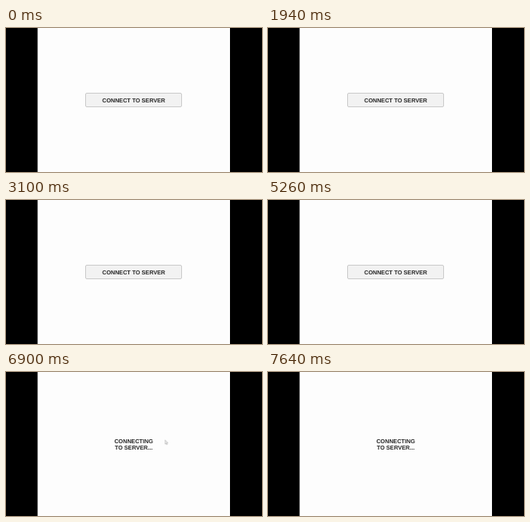
An HTML page that plays this animation: 320 by 180 pixels, repeating every 8000 ms.

```html
<!DOCTYPE html>
<html lang="en">
<head>
<meta charset="utf-8">
<title>Connect to server</title>
<style>
  html, body { margin: 0; width: 100%; height: 100%; overflow: hidden; background: #000; }
  svg { display: block; width: 100%; height: 100%; }
  text {
    font: bold 7.2px "Liberation Sans", Arial, sans-serif;
    fill: #262626;
    text-anchor: middle;
    text-rendering: geometricPrecision;
  }
  .button { animation: button 8s step-end infinite; }
  .status { animation: status 8s step-end infinite; }
  .pointer { animation: pointer 8s step-end infinite; }

  @keyframes button {
    0% { visibility: visible; }
    83.75%, 100% { visibility: hidden; }
  }
  @keyframes status {
    0% { visibility: hidden; }
    83.75%, 100% { visibility: visible; }
  }
  @keyframes pointer {
    0% { visibility: hidden; transform: translate(258.5px, 128px); }
    36.25% { visibility: visible; transform: translate(258.5px, 128px); }
    38.75% { visibility: hidden; transform: translate(167.6px, 92px); }
    83.75% { visibility: visible; transform: translate(167.6px, 92px); }
    86.25% { visibility: visible; transform: translate(198.5px, 84.8px); }
    88.75%, 100% { visibility: hidden; transform: translate(198.5px, 84.8px); }
  }
</style>
</head>
<body>
<svg viewBox="0 0 320 180">
  <rect width="320" height="180" fill="#000"/>
  <rect x="39.5" width="240.5" height="180" fill="#fdfdfd"/>
  <g class="button">
    <rect x="99.5" y="81.5" width="120" height="17" rx="1.5" fill="#f2f2f2" stroke="#cbcbcb"/>
    <text x="159.6" y="93">CONNECT TO SERVER</text>
  </g>
  <g class="status">
    <text x="159.6" y="88.9">CONNECTING</text>
    <text x="159.6" y="97.1">TO SERVER...</text>
  </g>
  <path class="pointer" d="M.3 .3V5L1.4 4.1L2.2 5.9L3.1 5.5L2.3 3.8H3.8Z"
        fill="#fdfdfd" stroke="#999" stroke-width=".6" stroke-linejoin="round"/>
</svg>
</body>
</html>
```
